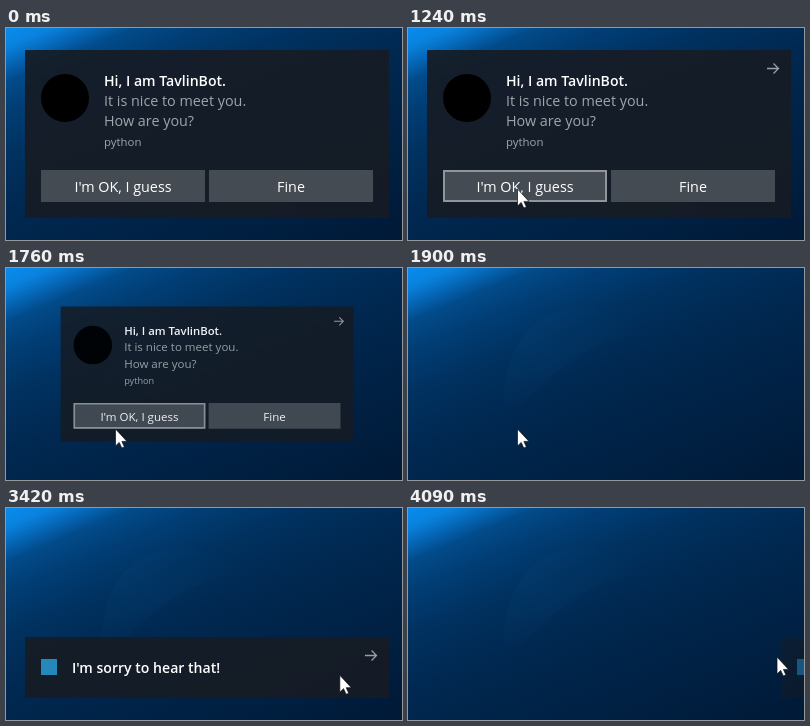
An HTML page that plays this animation: 396x212 px, repeating every 4.15 s.

```html
<!DOCTYPE html>
<html lang="en">
<head>
<meta charset="utf-8">
<title>Toast notification</title>
<style>
html, body { margin: 0; width: 100%; height: 100%; overflow: hidden; background: #00224a; }
svg {
  display: block; width: 100%; height: 100%;
  background: linear-gradient(157deg, #0a8cee 0, #0982de 18px, #0566b6 34px, #024b8a 50px,
    #013d74 78px, #00315f 120px, #002850 175px, #001a38 340px);
}
text { font: 14.35px "Open Sans", "Noto Sans", sans-serif; fill: #a0a6ac; }
.title { font-weight: 600; font-size: 14.1px; fill: #fff; }
.small { font-size: 11.4px; }
.label { fill: #fff; text-anchor: middle; }
.panel { fill: #161c24; fill-opacity: .92; }
.button { fill: #454b53; }
.arrow { fill: none; stroke: #9a9fa5; stroke-width: 1.3; }
</style>
</head>
<body>
<svg viewBox="0 0 396 212">
  <defs>
    <radialGradient id="glow" cx=".2" cy=".4" r=".8">
      <stop stop-color="#1a78b8" stop-opacity=".07"/>
      <stop offset="1" stop-color="#1a78b8" stop-opacity="0"/>
    </radialGradient>
  </defs>
  <path d="M95 140Q96 62 150 44Q205 34 240 66Q180 66 112 138Z" fill="url(#glow)"/>

  <g id="question">
    <path class="panel" d="M19 22H383V190H19Z"/>
    <circle cx="59" cy="70" r="24"/>
    <text class="title" x="98" y="58">Hi, I am TavlinBot.</text>
    <text x="98" y="78">It is nice to meet you.</text>
    <text x="98" y="98">How are you?</text>
    <text class="small" x="98" y="118">python</text>
    <path id="ok" class="button" d="M35 142H199V174H35Z"/>
    <path id="ring" d="M36 143H198V173H36Z" fill="none" stroke="#90959a" stroke-width="2"/>
    <path class="button" d="M203 142H367V174H203Z"/>
    <text class="label" x="117" y="164">I'm OK, I guess</text>
    <text class="label" x="285" y="164">Fine</text>
    <path id="arrow1" class="arrow" d="M359 40.5H370.5M365.5 35.5L370.5 40.5L365.5 45.5"/>
  </g>

  <g id="reply">
    <path class="panel" d="M19 129H383V190H19Z"/>
    <path d="M35 151H51V167H35Z" fill="#2587ba"/>
    <text class="title" x="66" y="165">I'm sorry to hear that!</text>
    <path id="arrow2" class="arrow" d="M359 147.5H370.5M365.5 142.5L370.5 147.5L365.5 152.5"/>
  </g>

  <path id="cursor" d="M.5 0V17L4.2 13.4L6.8 19L9.4 17.9L6.9 12.4H12Z"
        fill="#fff" stroke="#111" stroke-width=".7"/>
</svg>
<script>
const LOOP = 4150;
const $ = id => document.getElementById(id);
const show = (id, on) => $(id).style.display = on ? "" : "none";
const place = (id, transform) => $(id).setAttribute("transform", transform);
const progress = (t, from, to) => Math.min(1, Math.max(0, (t - from) / (to - from)));

// Pointer moves: from, to, dx, dy
const moves = [[420, 940, -62, 124], [1020, 1240, 21, 32],
  [2830, 3200, 71, 20], [3210, 3700, 188.5, -32]];

function pointer(t) {
  let x = 150, y = 5;
  for (const [from, to, dx, dy] of moves) {
    const p = progress(t, from, to);
    x += dx * (1 - (1 - p) ** 3);
    y += dy * p;
  }
  return [x, y];
}

function draw(t) {
  const [x, y] = pointer(t);
  show("cursor", t >= 420);
  place("cursor", `translate(${x} ${y})`);

  const pressed = t >= 1380 && t < 1520;
  const shrink = progress(t, 1520, 1900);
  show("question", shrink < 1);
  show("arrow1", t >= 420 && y >= 22);
  show("ring", y >= 142 && !pressed);
  $("ok").style.fill = pressed ? "#70757b" : "";
  place("question", `translate(201 106) scale(${1 - .31 * shrink}) translate(-201 -106)`);
  $("question").setAttribute("opacity", 1 - shrink ** 6);

  const slide = progress(t, 3900, 4090);
  show("reply", t >= 2140);
  show("arrow2", t >= 2750);
  $("arrow2").style.stroke = x >= 356 && y < 160 ? "#fff" : "";
  place("reply", `translate(${354 * slide ** 1.5} 0)`);
  $("reply").setAttribute("opacity", 1 - .45 * slide);
}

let start;
function frame(now) {
  start ??= now;
  draw((now - start) % LOOP);
  requestAnimationFrame(frame);
}
draw(0);
requestAnimationFrame(frame);
</script>
</body>
</html>
```
